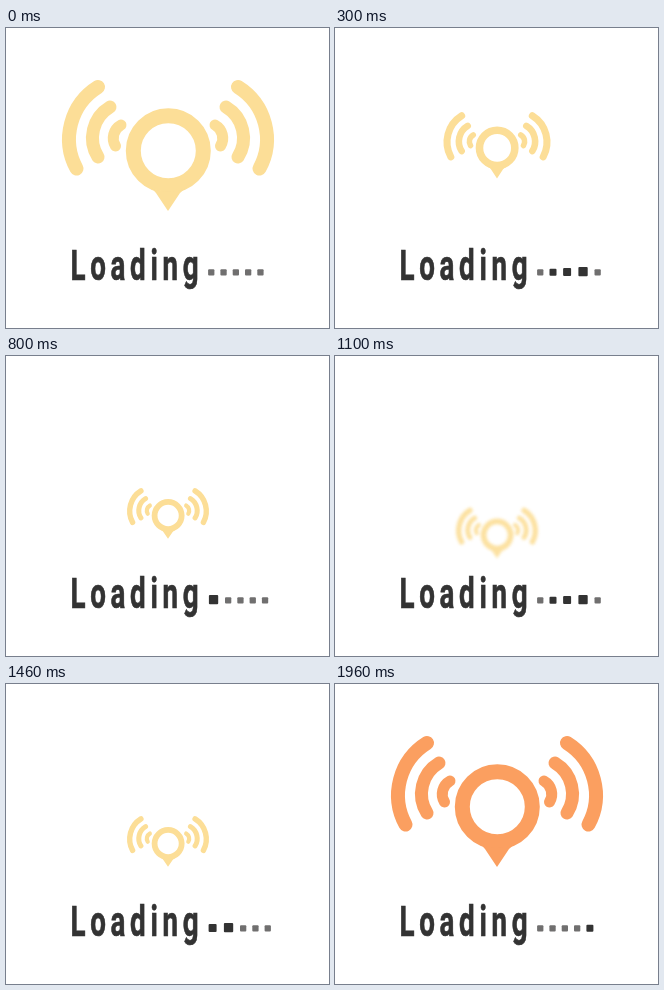
Write an HTML page that moves like this. It is 323 px wide and 300 px high and loops after 2010 ms.

```html
<!DOCTYPE html>
<html lang="en">
<head>
<meta charset="utf-8">
<title>Loading</title>
<style>
  html, body { margin: 0; width: 100%; height: 100%; overflow: hidden; background: #fff; }
  svg { display: block; width: 323px; height: 300px; }
  text {
    font: bold 42px Roboto, "Open Sans", sans-serif;
    letter-spacing: 7.1px;
    fill: #333; stroke: #333; stroke-width: .7px;
  }
</style>
</head>
<body>
<svg viewBox="0 0 323 300">
  <defs>
    <g id="waves" fill="none" stroke="currentColor" stroke-linecap="round">
      <path d="M92 59A61.5 61.5 0 0 0 70.5 140.5" stroke-width="14"/>
      <path d="M104 79A36 36 0 0 0 92 129" stroke-width="13"/>
      <path d="M115 97A15 15 0 0 0 109.5 118" stroke-width="11"/>
    </g>
  </defs>
  <g id="haze">
    <g id="icon">
      <use href="#waves"/>
      <use href="#waves" transform="translate(324 0) scale(-1 1)"/>
      <circle cx="162.3" cy="122.7" r="35" fill="none" stroke="currentColor" stroke-width="15"/>
      <path d="M143 159Q148 162 150 165L162 183L174 165Q177 162 182 159Q162 168 143 159Z" fill="currentColor"/>
    </g>
  </g>
  <text transform="translate(64.5 252) scale(.66 1)">Loading</text>
  <g id="dots"></g>
</svg>
<script>
const PALE = '#fcde97', ORANGE = '#fb9f60';
const LOOP = 2010;
const STEPS = [0, 50, 100, 200, 300, 400, 500, 600, 700, 800, 900, 1000,
  1100, 1120, 1140, 1160, 1260, 1360, 1460, 1560, 1660, 1760, 1860, 1960];

// Poses: first step, scale, centre y, blur, opacity, colour
const POSES = [
  [0, 1, 117.5, 0, 1, PALE],
  [2, .8, 117.5, 0, 1, PALE],
  [3, .62, 117.5, 0, 1, PALE],
  [4, .505, 117.3, 0, 1, PALE],
  [6, .505, 137.5, 0, 1, PALE],
  [8, .387, 157.5, 0, 1, PALE],
  [11, .387, 167.5, 1, .95, PALE],
  [12, .387, 177, 1.8, .9, PALE],
  [16, .387, 167.5, 1, .95, PALE],
  [17, .387, 157.5, 0, 1, PALE],
  [19, .505, 137.5, 0, 1, PALE],
  [20, 1, 117.5, 0, 1, PALE],
  [21, 1, 117.5, 0, 1, ORANGE]
];

// Dot size and half gap by steps since the wave passed
const SIZES = [9.3, 8, 7, 6.3];
const GAPS = [3.8, 3.5, 3.1, 3];

const haze = document.getElementById('haze');
const icon = document.getElementById('icon');
const dots = Array.from({ length: 5 }, () => {
  const dot = document.createElementNS('http://www.w3.org/2000/svg', 'rect');
  dot.setAttribute('rx', 1);
  return document.getElementById('dots').appendChild(dot);
});

function setAttrs(el, attrs) {
  for (const key in attrs) el.setAttribute(key, attrs[key]);
}

function drawIcon(step) {
  const [, scale, y, blur, opacity, color] = POSES.findLast(pose => pose[0] <= step);
  icon.setAttribute('transform', `translate(162 ${y}) scale(${scale}) translate(-162 -117.5)`);
  icon.style.color = color;
  haze.style.filter = blur ? `blur(${blur}px)` : 'none';
  haze.style.opacity = opacity;
}

function drawDots(step) {
  const peak = step % 8;
  let x = 199.1;
  dots.forEach((dot, i) => {
    const since = peak - (i + 1);
    const age = since >= 0 && since < 3 ? since : 3;
    const size = SIZES[age], gap = GAPS[age];
    const bottom = 247.6 + (size - 6.3) * .2;
    setAttrs(dot, {
      x: x + gap, y: bottom - size, width: size, height: size,
      fill: age < 3 ? '#333' : '#706f6f'
    });
    x += size + gap * 2;
  });
}

const start = performance.now();
let shown = -1;

function render() {
  const time = (performance.now() - start) % LOOP;
  const step = STEPS.findLastIndex(at => at <= time);
  if (step !== shown) {
    drawIcon(step);
    drawDots(step);
    shown = step;
  }
  requestAnimationFrame(render);
}
render();
</script>
</body>
</html>
```
